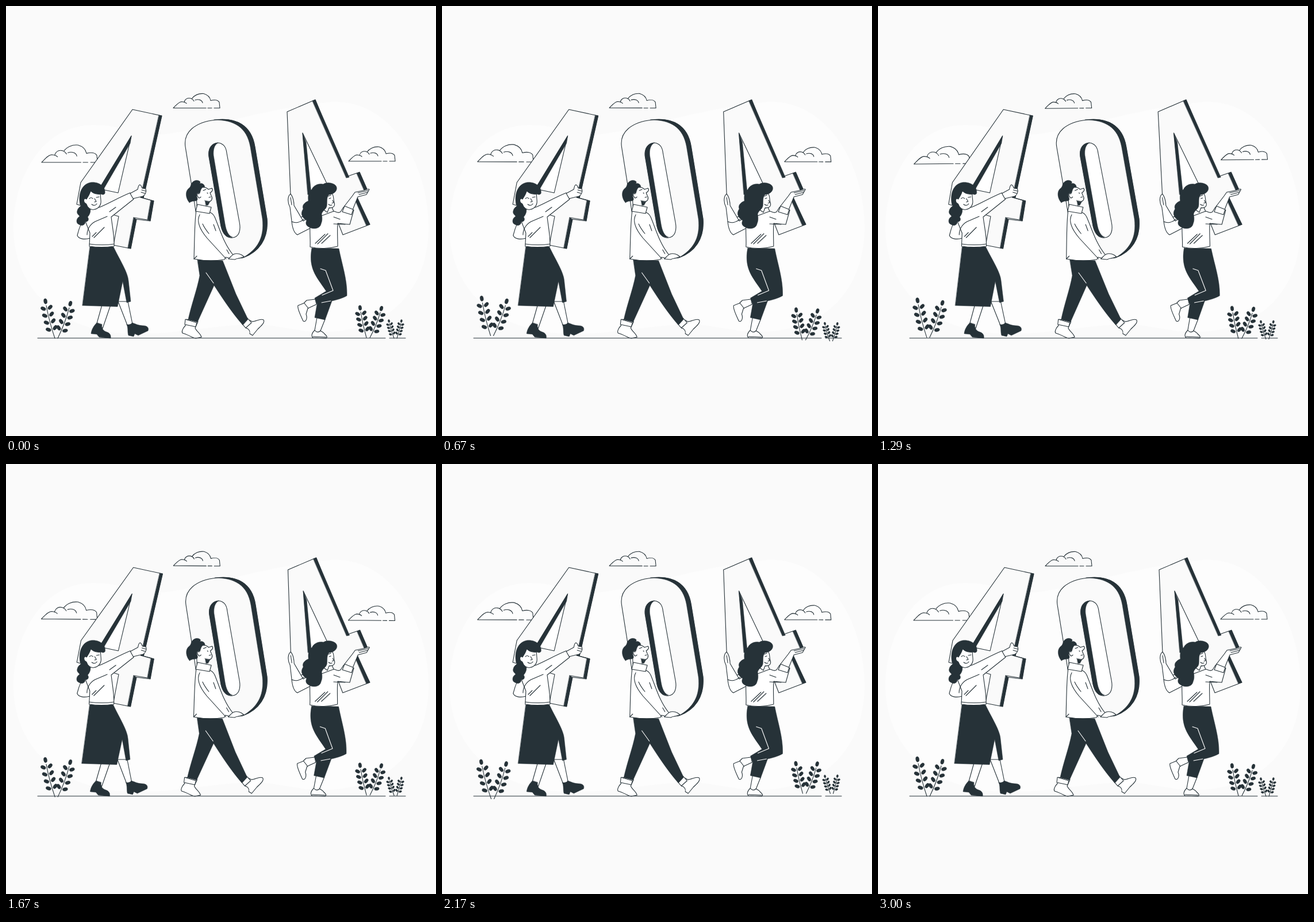
An HTML page for the animation above (3.04 s loop, 748x748 px).

```html
<!DOCTYPE html>
<html lang="en">
<head>
<meta charset="utf-8">
<title>404</title>
<style>
  html, body { margin: 0; width: 100%; height: 100%; overflow: hidden; background: #fafafa; }
  svg { display: block; width: 100vw; height: 100vh; }
  path { stroke-width: 1.1; stroke-linecap: round; stroke-linejoin: round; }
  .o { fill: #fff; stroke: #263238; }
  .n { fill: #fafafa; stroke: #263238; }
  .d { fill: #263238; stroke: #263238; stroke-width: .5; }
  .l { fill: none; stroke: #263238; }
  .w { fill: none; stroke: #fff; }
  .b { fill: #fdfdfd; }
</style>
</head>
<body>
<svg viewBox="0 0 748 748">
  <defs>
    <path id="cloud" class="l" vector-effect="non-scaling-stroke" d="M0 0H57M60 0H67M71 0H81M0 0C6-6 9-10 14-11C18-11 21-10 23-8M19-10C20-16 25-18 30-17C33-16 35-14 36-12M32-16C36-22 44-26 53-25C60-23 64-18 65-13M38-14C44-16 50-14 51-9M65-13C72-15 78-14 80-10L81 0"/>
  </defs>

  <path class="b" d="M13 385C13 300 62 208 150 207C205 206 235 229 285 222C360 211 450 178 565 167C665 160 735 270 735 385C735 480 680 564 555 567C510 569 470 552 420 554C330 559 290 572 215 570C90 566 13 490 13 385Z"/>

  <g id="clouds">
    <use href="#cloud" transform="translate(62 272) scale(1.2)"/>
    <use href="#cloud" x="291" y="177.5"/>
    <use href="#cloud" x="596" y="270"/>
  </g>

  <g id="crew">
    <!-- left four -->
    <path class="n" d="M220 180L271 191L239 334L257 339L251 374L227 371L217 422L187 416L196 366L123 345L130 307Z"/>
    <path class="d" d="M266 190L271 191L239 334L234 333ZM252 338L257 339L251 374L246 372ZM222 368L227 371L217 422L212 421Z"/>
    <path class="l" d="M234 333L252 338M246 372L222 368"/>
    <path class="o" d="M218 226L162 318L195 325Z"/>
    <path class="d" d="M218 226L162 318L169 320L216 239Z"/>

    <!-- zero -->
    <path class="n" d="M312 245C308 219 329 202 365 198C400 194 427 207 433 245L454 370C457 405 440 428 412 438C370 444 338 416 333 375Z"/>
    <path class="d" d="M362 198C400 193 427 207 433 245L454 370C457 405 440 428 412 438C436 424 450 405 446 370L425 245C419 211 397 198 362 198Z"/>
    <path class="o" d="M353 262C351 247 359 238 369 238C378 239 383 246 384 256L406 376C409 391 405 402 394 403C383 404 377 396 374 383Z"/>
    <path class="d" d="M353 262C351 247 359 238 369 238C363 241 360 249 361 260L381 379C383 391 387 400 394 402C383 404 377 396 374 383Z"/>

    <!-- right four -->
    <path class="n" d="M489 184L538 163L592 297L615 289L629 321L608 329L633 380L586 398L567 350L498 372L495 328Z"/>
    <path class="d" d="M533 165L538 163L597 298L592 299ZM610 291L615 289L629 321L624 323ZM604 330L609 328L633 380L627 382Z"/>
    <path class="o" d="M516 221L526 328L563 319Z"/>
    <path class="d" d="M516 221L522 237L531 326L525 328Z"/>

    <!-- woman with the left four -->
    <path class="o" d="M167 520L158 552L168 561L182 520ZM195 514L211 555L220 553L212 514Z"/>
    <path class="d" d="M158 551C153 556 149 562 148 570L158 571L162 576L182 578C183 573 181 569 175 567C168 565 166 559 167 554ZM210 554C213 561 211 567 213 573L222 575L224 570L230 573L247 565C249 560 246 556 238 556C230 556 224 552 219 551C218 554 214 556 210 554Z"/>
    <path class="d" d="M146 419L187 419C198 442 212 463 213 478L217 514L210 516L203 479L194 523L133 521Z"/>
    <path class="o" d="M139 365C131 374 126 391 124 399C126 405 136 407 146 404L148 375Z"/>
    <path class="o" d="M145 354C140 361 138 370 139 377L146 395L145 418C158 420 174 420 188 418L188 412C188 398 185 384 183 367L222 336L216 325C196 333 178 344 163 350Z"/>
    <path class="l" d="M145 414C160 416 175 416 188 414M141 398C141 388 147 379 155 375M155 375L176 366M153 403L169 387M150 401L157 394M161 395L171 385M180 358L191 350"/>
    <path class="o" d="M216 326L229 319C230 316 230 311 233 311C236 312 236 316 237 317L243 318C245 323 242 329 238 331L221 335Z"/>
    <path class="l" d="M236 320L243 322M235 324L242 326"/>
    <path class="d" d="M144 346C137 343 126 348 124 356C122 362 128 364 128 366C122 369 121 378 127 380C133 384 138 380 138 375C143 376 145 371 142 367C147 362 149 353 144 346Z"/>
    <path class="d" d="M129 346C125 326 132 310 147 307C161 305 174 314 172 326C170 329 167 328 165 327L150 345L137 352Z"/>
    <path class="o" d="M140 336C137 333 134 337 136 341C137 344 140 343 140 345C142 352 148 355 153 354C161 353 166 346 165 338L164 327C157 328 151 326 147 321C146 328 142 332 140 336Z"/>
    <path class="l" d="M145 335C147 333 149 333 151 335M157 333L162 332M154 335L157 340L154 341M149 345C153 348 156 347 158 344"/>

    <!-- man with the zero -->
    <path class="o" d="M314 545L312 556C308 560 305 566 307 569C316 571 323 577 330 578L340 576C338 569 331 566 329 560L334 549ZM412 554L421 545L428 549C435 549 442 543 448 546C451 551 443 557 438 562L429 573L424 570C425 565 422 561 417 560Z"/>
    <path class="o" d="M312 545L332 551L330 558L311 554ZM410 552L420 543L427 551L417 560Z"/>
    <path class="d" d="M333 441L377 443L400 501L421 545L412 555C396 537 380 514 362 486L333 550L317 545C323 518 333 491 337 469Z"/>
    <path class="w" d="M348 464L361 482"/>
    <path class="o" d="M331 319C339 313 347 314 352 319L358 317C361 320 358 323 355 325L357 330C360 334 358 340 353 340L348 339L348 350L332 348Z"/>
    <path class="d" d="M346 338C349 341 352 341 355 340L351 347L348 346Z"/>
    <path class="l" d="M343 321L348 319M350 325L351 326M353 333L356 332M336 327C333 325 331 329 334 332C335 335 338 334 339 332"/>
    <path class="d" d="M319 342C313 335 311 324 317 318C320 316 321 314 322 310C325 303 334 301 338 306L337 309C342 307 347 312 345 316C340 314 339 320 337 326C333 324 330 328 332 332C334 336 333 339 330 339C326 339 322 340 319 342Z"/>
    <path class="o" d="M331 356C328 371 328 407 327 440C342 443 361 444 380 441L382 437L391 439L395 433C378 412 372 388 363 367C360 361 357 359 353 359Z"/>
    <path class="o" d="M333 345L357 350L354 361L330 357Z"/>
    <path class="l" d="M337 363C330 376 339 391 350 404L383 440M342 379C345 386 349 391 353 396M361 380L365 391M384 424L388 431M332 435L327 440"/>
    <path class="o" d="M391 436C397 429 404 430 410 433L414 436C410 439 403 438 398 441L387 440Z"/>

    <!-- woman with the right four -->
    <path class="o" d="M523 512L518 517L508 521C506 526 513 539 517 548C521 551 525 544 522 536L525 526L540 519L538 510ZM541 542L537 564C531 570 531 575 534 577L557 578C561 575 555 572 552 568L547 565L555 545Z"/>
    <path class="l" d="M519 517L526 526M537 564C540 568 544 568 547 565M534 575L557 576"/>
    <path class="d" d="M532 421L579 422C585 452 594 477 593 504C584 509 576 511 567 513L555 546L537 542L541 519L537 508L557 496C542 473 525 458 532 421Z"/>
    <path class="w" d="M547 457L556 460L569 495L550 503M549 516L565 513"/>
    <path class="o" d="M497 374L494 350C489 341 490 330 495 327C499 331 501 341 501 347L517 374L535 363L538 382L507 398C501 395 498 385 497 374Z"/>
    <path class="l" d="M497 375C503 378 511 377 518 371M495 333L497 346"/>
    <path class="o" d="M530 372C527 387 530 404 529 419C544 423 563 422 577 418C577 405 576 391 577 378L598 380L605 355L587 350L582 358C577 362 574 357 570 357Z"/>
    <path class="o" d="M588 349L602 331L607 324L621 321C626 320 631 317 632 319L627 328L612 332L602 357Z"/>
    <path class="o" d="M589 348L604 354L601 363L585 358Z"/>
    <path class="l" d="M612 325L630 321M614 328L629 324M538 413L555 397M542 414L560 396M549 413L564 399M570 379L590 380M570 367L581 371"/>
    <path class="o" d="M553 330L567 326C571 331 569 336 571 342C573 348 569 352 562 351L559 359L549 352Z"/>
    <path class="l" d="M562 335L565 334M568 338L570 342L567 343M561 345C563 347 565 347 567 346M560 331L565 329"/>
    <path class="d" d="M552 310C558 305 573 308 575 315C577 322 569 328 562 328C557 332 559 342 558 348C557 354 550 356 549 362C551 372 549 376 548 379C546 389 532 388 528 385C521 382 521 377 523 373C514 368 512 360 517 353C514 346 521 341 526 339C525 330 526 323 532 319C535 311 546 308 552 310Z"/>
  </g>

  <g id="plants"></g>
  <path class="l" d="M55 577.7H660M667 577.7H695"/>
</svg>
<script>
const $ = id => document.getElementById(id);

// A curved stem with pairs of leaves and one leaf at the tip.
function sprig(x, y, tipX, tipY, size) {
  const cx = x + (tipX - x) * .65, cy = (y + tipY) / 2;
  const leaf = (px, py, a) =>
    `<ellipse class="d" rx="${4.6 * size}" ry="${2.9 * size}" transform="translate(${px + Math.cos(a) * 7.5 * size} ${py + Math.sin(a) * 7.5 * size}) rotate(${a * 180 / Math.PI})"/>`;
  let out = `<path class="l" d="M${x} ${y}Q${cx} ${cy} ${tipX} ${tipY}"/>`;
  for (let i = 0; i < 4; i++) {
    const u = .22 + i * .21, v = 1 - u;
    const px = v * v * x + 2 * u * v * cx + u * u * tipX;
    const py = v * v * y + 2 * u * v * cy + u * u * tipY;
    const a = Math.atan2(v * (cy - y) + u * (tipY - cy), v * (cx - x) + u * (tipX - cx));
    out += leaf(px, py, a - .95) + leaf(px, py, a + .95);
  }
  return out + leaf(tipX, tipY, Math.atan2(tipY - cy, tipX - cx));
}

$('plants').innerHTML =
  sprig(85, 578, 70, 521, 1) + sprig(90, 578, 110, 525, 1) +
  sprig(627, 577, 617, 532, .94) + sprig(633, 577, 651, 533, .94) +
  sprig(675, 578, 667, 552, .55) + sprig(680, 578, 687, 552, .55);

// Triangle wave: 0, 1, 0, -1 at each quarter of the period.
const sway = (t, period) => {
  const p = (t / period + .25) % 1;
  return 1 - Math.abs(p * 4 - 2);
};

function draw(now) {
  const t = Math.min(now % 3040, 3000);
  const fast = sway(t, 1500), slow = sway(t, 3000);
  $('clouds').setAttribute('transform', `rotate(${fast} 369 211)`);
  $('crew').setAttribute('transform', `translate(0 370) skewX(${-fast}) translate(0 -370)`);
  $('plants').setAttribute('transform', `rotate(${slow} 374 544)`);
  requestAnimationFrame(draw);
}
draw(performance.now());
</script>
</body>
</html>
```
